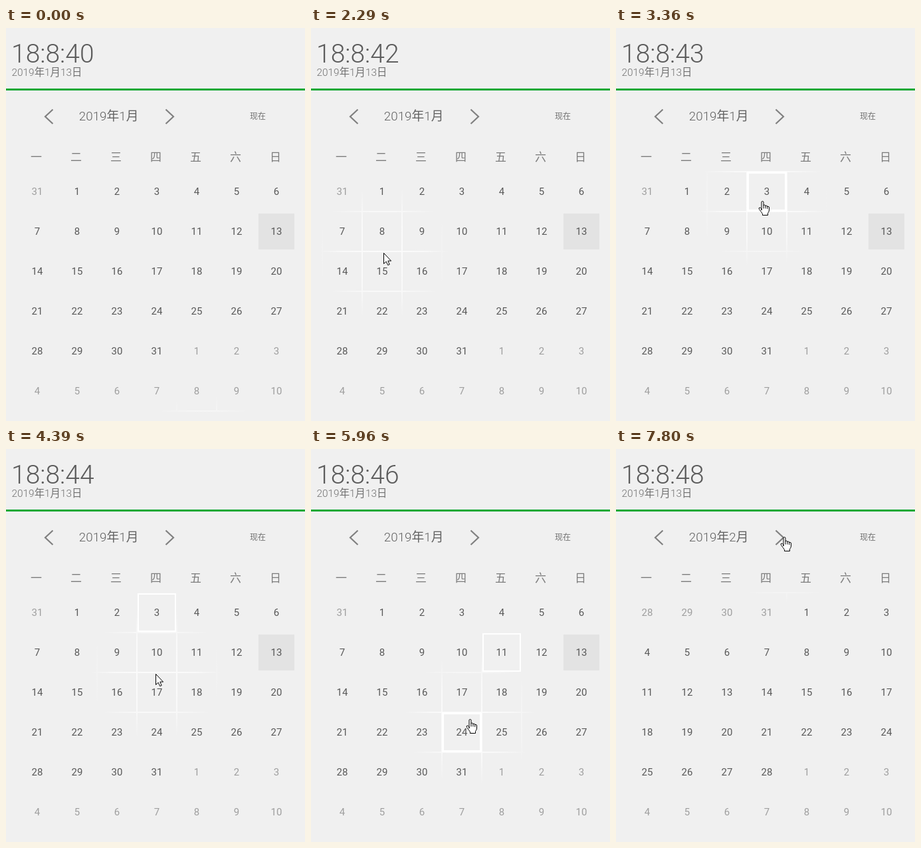
These frames come from a looping animation (450 by 591 pixels, 8000 ms). An HTML page:

```html
<!DOCTYPE html>
<html lang="zh-CN">
<head>
<meta charset="utf-8">
<title>Calendar</title>
<style>
  html, body { margin: 0; width: 100%; height: 100%; overflow: hidden; background: #f0f0f0; }
  svg { display: block; }
  text { font-family: Roboto, "Noto Sans CJK SC", "Noto Sans CJK", sans-serif; fill: #707070; font-weight: 300; }
  #clock { font-size: 39px; fill: #5c5c5c; }
  #date { font-size: 15.4px; }
  #month { font-size: 18.8px; fill: #626262; }
  #now { font-size: 12px; }
  .week { font-size: 17px; text-anchor: middle; fill: #7c7c7c; }
  .day { font-size: 15px; text-anchor: middle; font-weight: 400; fill: #585858; }
  .day.dim { fill: #9e9e9e; }
  .arrow { fill: none; stroke: #808080; stroke-width: 2.2; }
  .box { fill: none; stroke: #fff; }
  .pointer { fill: #fff; stroke: #000; stroke-linejoin: round; }
</style>
</head>
<body>
<svg width="450" height="591" viewBox="0 0 450 591">
  <defs>
    <radialGradient id="glow" gradientUnits="userSpaceOnUse" cx="0" cy="0" r="100">
      <stop offset="0" stop-color="#fff" stop-opacity=".8"/>
      <stop offset=".6" stop-color="#fff" stop-opacity=".6"/>
      <stop offset="1" stop-color="#fff" stop-opacity="0"/>
    </radialGradient>
  </defs>
  <rect width="450" height="591" fill="#f0f0f0"/>
  <text id="clock" x="8" y="52"></text>
  <text id="date" x="8.5" y="71.5">2019年1月13日</text>
  <rect y="91" width="450" height="3" fill="#14a936"/>
  <path class="arrow" d="M70.5 122.5L59 133.2L70.5 144M240.5 122.5L252 133.2L240.5 144"/>
  <text id="month" x="109.8" y="138.5"></text>
  <text id="now" x="367" y="137">现在</text>
  <rect id="today" x="380" y="279" width="54" height="54" fill="#e3e3e3"/>
  <path id="grid" fill="none" stroke="url(#glow)" stroke-width="2"/>
  <rect id="chosen" class="box" width="56" height="56" stroke-width="2"/>
  <rect id="hover" class="box" width="57" height="57" stroke-width="3"/>
  <g id="labels"></g>
  <circle id="press" r="12" fill="#ff0" fill-opacity=".55"/>
  <g id="pointer" class="pointer">
    <path id="arrow" d="M.5 .5V16.5L4.2 13.2L6.7 18.6L9.2 17.6L6.8 12.2H11.6Z"/>
    <g id="hand" transform="translate(-6 -1)">
      <path d="M5 14V2Q5 .5 6.5 .5Q8 .5 8 2V7Q8 6 9.5 6Q10.8 6 11 8Q11.2 7 12.3 7Q13.7 7 13.8 9Q14 8.2 15 8.3Q16.5 8.5 16.5 10V14Q16.5 16 14.5 18.5V21.5H6.5V19.5Q5 17 1.5 12.5Q.5 10.5 2 10Q3.5 9.7 5 12Z"/>
      <path fill="none" d="M8 7V11.5M11 8V11.5M13.8 9V12"/>
    </g>
  </g>
</svg>
<script>
const LOOP = 8000, LEFT = 17, TOP = 216, CELL = 60, COLS = 7, ROWS = 6;
const $ = id => document.getElementById(id);
const show = (el, on) => el.setAttribute('visibility', on ? 'visible' : 'hidden');

// Each hop bends towards a control point and rests at its end until the next
const ENTRY = [236, 591], OUTSIDE = [297, 651];
const hops = [
  { from: 850, to: 1640, bend: [189, 540], end: [213, 438] },
  { from: 1640, to: 2490, bend: [122, 342], end: [102, 334] },
  { from: 2540, to: 3360, bend: [285, 468], end: [220, 261] },
  { from: 4150, to: 4940, bend: [225, 476], end: [293, 314] },
  { from: 5400, to: 6190, bend: [255, 478], end: [228, 377] },
  { from: 6380, to: 7340, bend: [250, 185], end: [253, 133] }
];
const presses = [[3590, 3740], [5120, 5250], [6240, 6380], [7570, 7800]];

function addText(cls, x, y, value) {
  const el = document.createElementNS('http://www.w3.org/2000/svg', 'text');
  el.setAttribute('class', cls);
  el.setAttribute('x', x);
  el.setAttribute('y', y);
  el.textContent = value;
  $('labels').append(el);
  return el;
}

[...'一二三四五六日'].forEach((c, i) => addText('week', 45.6 + i * CELL, 200, c));
const days = Array.from({ length: COLS * ROWS }, (_, i) =>
  addText('day', 47 + i % COLS * CELL, 251 + Math.floor(i / COLS) * CELL, ''));

let lines = '';
for (let c = 0; c <= COLS; c++) lines += `M${LEFT + c * CELL} ${TOP}v${ROWS * CELL}`;
for (let r = 0; r <= ROWS; r++) lines += `M${LEFT} ${TOP + r * CELL}h${COLS * CELL}`;
$('grid').setAttribute('d', lines);

let shownMonth = 0;
function setMonth(month) {
  if (month === shownMonth) return;
  shownMonth = month;
  const lead = (new Date(2019, month - 1, 1).getDay() + 6) % 7;
  const count = new Date(2019, month, 0).getDate();
  const before = new Date(2019, month - 1, 0).getDate();
  $('month').textContent = `2019年${month}月`;
  days.forEach((el, i) => {
    const n = i - lead + 1;
    el.textContent = n < 1 ? n + before : n > count ? n - count : n;
    el.classList.toggle('dim', n < 1 || n > count);
  });
  show($('today'), month === 1);
}

function pointerAt(t) {
  const i = hops.findLastIndex(h => t >= h.from);
  if (i < 0) return OUTSIDE;
  const { from, to, bend, end } = hops[i], begin = i ? hops[i - 1].end : ENTRY;
  const u = Math.min(1, (t - from) / (to - from)), s = u * u * (3 - 2 * u);
  return end.map((e, k) => (1 - s) ** 2 * begin[k] + 2 * s * (1 - s) * bend[k] + s * s * e);
}

function cellAt([x, y]) {
  const c = Math.floor((x - LEFT) / CELL), r = Math.floor((y - TOP) / CELL);
  const inside = v => v >= 3 && v <= CELL - 3;
  return c >= 0 && c < COLS && r >= 0 && r < ROWS &&
    inside(x - LEFT - c * CELL) && inside(y - TOP - r * CELL) ? [c, r] : null;
}

const overNext = ([x, y]) => Math.abs(x - 246) < 20 && Math.abs(y - 133) < 20;

function placeBox(el, cell, inset) {
  show(el, cell);
  if (!cell) return;
  el.setAttribute('x', LEFT + cell[0] * CELL + inset);
  el.setAttribute('y', TOP + cell[1] * CELL + inset);
}

function draw(t) {
  const spot = pointerAt(t), [x, y] = spot;
  const cell = cellAt(spot), hand = cell || overNext(spot);
  const released = presses.findLast(p => t >= p[1]);
  const target = released && pointerAt(released[0]);

  $('clock').textContent = '18:8:' + (40 + Math.floor((t + 380) / 1000));
  setMonth(target && overNext(target) ? 2 : 1);
  placeBox($('chosen'), target && cellAt(target), 2);
  placeBox($('hover'), cell, 1.5);

  $('glow').setAttribute('cx', x);
  $('glow').setAttribute('cy', y);
  $('pointer').setAttribute('transform', `translate(${Math.round(x)} ${Math.round(y)})`);
  show($('hand'), hand);
  show($('arrow'), !hand);

  show($('press'), presses.some(([on, off]) => t >= on && t < off));
  $('press').setAttribute('cx', x);
  $('press').setAttribute('cy', y);
}

const start = performance.now();
function tick() {
  draw((performance.now() - start) % LOOP);
  requestAnimationFrame(tick);
}
tick();
</script>
</body>
</html>
```
